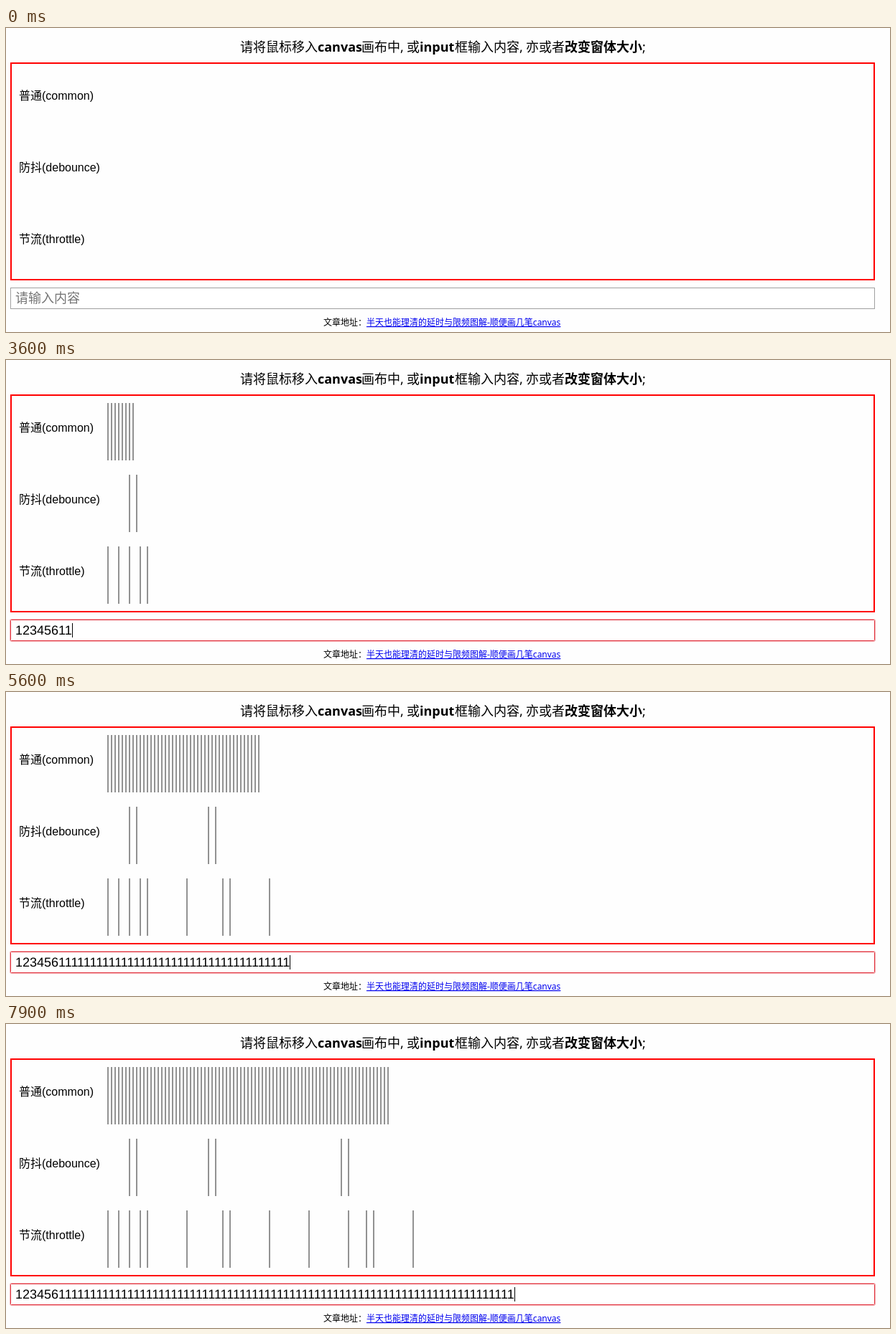
Recreate the animation shown at these times as an HTML page. Size 1231 by 424 pixels, loop 8 s.

```html
<!DOCTYPE html>
<html lang="zh-CN">
<head>
<meta charset="utf-8">
<title>输入事件演示</title>
<style>
  html, body { margin: 0; width: 100%; height: 100%; overflow: hidden; background: #fefefe; }
  svg { display: block; width: 1231px; height: 424px; }
  text { white-space: pre; font-family: "Noto Sans", "Noto Sans CJK SC", "Noto Sans CJK", sans-serif; }
  .title { font-size: 18px; }
  .bold { font-weight: 700; }
  .label { font: 16px "Liberation Sans", "Noto Sans CJK SC", "Noto Sans CJK", sans-serif; }
  .hint { font-size: 18px; fill: #757575; }
  .foot { font-size: 12px; }
  .link { fill: #0000ee; text-decoration: underline; }
  .typed {
    font: 18px "Liberation Sans", sans-serif;
    font-kerning: none;
    text-rendering: geometricPrecision;
  }
  .tight { letter-spacing: -1.336px; }
  .bars { fill: none; stroke: #929292; stroke-width: 2; shape-rendering: crispEdges; }
</style>
</head>
<body>
<svg viewBox="0 0 1231 424">
  <text class="title" y="33"><tspan x="326">请将鼠标移入</tspan><tspan x="434" class="bold">canvas</tspan><tspan x="495">画布中,</tspan><tspan x="558">或</tspan><tspan x="576" class="bold">input</tspan><tspan x="625">框输入内容,</tspan><tspan x="724">亦或者</tspan><tspan x="778" class="bold">改变窗体大小</tspan><tspan x="886">;</tspan></text>

  <rect x="7" y="49" width="1202" height="302" fill="none" stroke="#f00" stroke-width="2"/>
  <text class="label" x="18" y="100">普通(common)</text>
  <text class="label" x="18" y="200">防抖(debounce)</text>
  <text class="label" x="18" y="300">节流(throttle)</text>
  <path class="bars" id="bars"/>

  <rect id="idle" x="6.5" y="362.5" width="1203" height="29" fill="#fff" stroke="#a0a0a0"/>
  <g id="focus">
    <rect x="5.5" y="361.5" width="1205" height="31" rx="2" fill="none" stroke="#e62832" stroke-opacity=".35"/>
    <rect x="6.5" y="362.5" width="1203" height="29" rx="1" fill="#fff" stroke="#e0303c"/>
  </g>
  <text class="hint" id="hint" x="13" y="383">请输入内容</text>
  <text class="typed" x="13" y="383"><tspan id="head"></tspan><tspan id="tail" class="tight"></tspan></text>
  <rect id="caret" y="367" width="1" height="20"/>

  <text class="foot" x="442" y="415">文章地址：</text>
  <text class="foot link" x="502" y="415">半天也能理清的延时与限频图解-顺便画几笔canvas</text>
</svg>
<script>
  const LOOP = 8000, TICK = 100, FOCUS = 10;
  const LEFT = 142, STEP = 5;

  // Typing bursts: first tick, last tick, count at first, count at last
  const BURSTS = [
    [19, 20, 1, 2], [22, 22, 3, 3], [25, 26, 4, 5], [28, 28, 6, 6], [32, 32, 7, 7],
    [36, 41, 8, 26], [47, 47, 27, 27], [52, 60, 30, 56], [61, 62, 59, 61],
    [70, 70, 62, 62], [75, 79, 66, 79]
  ];
  const DEBOUNCED = [31, 34, 44, 50, 65, 72];                                // ticks
  const THROTTLED = [1, 3, 5, 7, 8, 18, 27, 28, 38, 48, 58, 62, 63, 73];     // key counts

  const el = id => document.getElementById(id);
  const show = (id, on) => el(id).setAttribute("visibility", on ? "visible" : "hidden");
  const bar = (slot, top) => `M${LEFT + STEP * slot} ${top}v80`;

  function typing(tick) {
    let count = 0, last = FOCUS;
    for (const [start, end, from, to] of BURSTS) {
      if (tick < start) break;
      last = Math.min(tick, end);
      count = end > start ? Math.round(from + (to - from) * (last - start) / (end - start)) : to;
    }
    return { count, last };
  }

  // Each call and each firing moves a row on by one slot
  function barPath(tick, count) {
    const common = Array.from({ length: count }, (_, i) => bar(i, 60));
    const debounce = DEBOUNCED.filter(t => t <= tick).map((t, i) => bar(typing(t).count + i, 160));
    const throttle = THROTTLED.filter(n => n <= count).map((n, i) => bar(n - 1 + i, 260));
    return [...common, ...debounce, ...throttle].join("");
  }

  function draw(tick) {
    const { count, last } = typing(tick);
    const focused = tick >= FOCUS;
    el("bars").setAttribute("d", barPath(tick, count));
    el("head").textContent = "123456".slice(0, count);
    el("tail").textContent = "1".repeat(Math.max(0, count - 6));
    el("caret").setAttribute("x", Math.round(13 + 10.01 * count - 1.336 * Math.max(0, count - 7)));
    show("caret", focused && (tick - last) % 10 < 5);
    show("focus", focused);
    show("idle", !focused);
    show("hint", count === 0);
  }

  const origin = performance.now();
  let shown = -1;
  function frame() {
    const tick = Math.floor((performance.now() - origin) % LOOP / TICK);
    if (tick !== shown) draw(shown = tick);
    requestAnimationFrame(frame);
  }
  frame();
</script>
</body>
</html>
```
